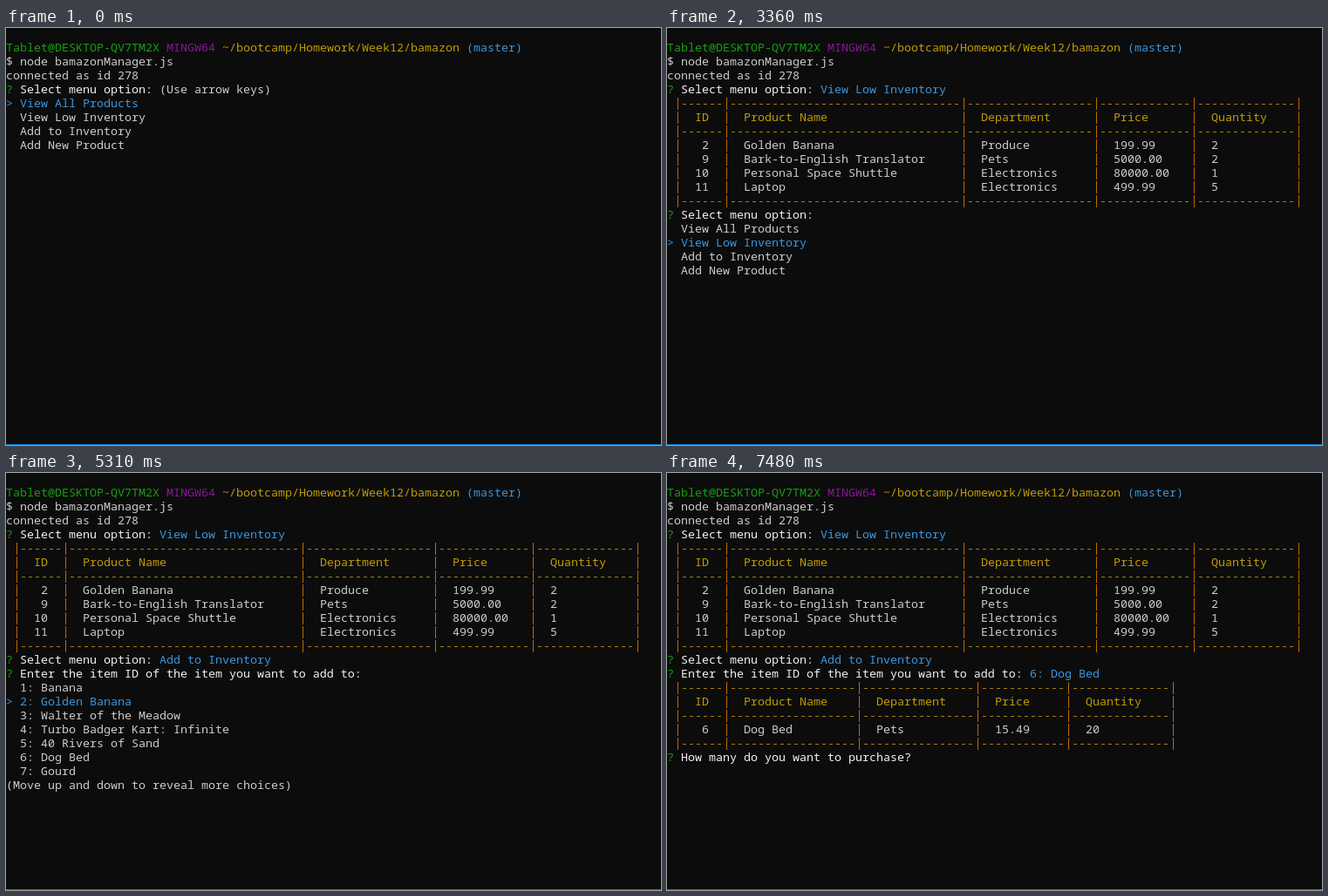
Animation of 751x479 px, one loop 8 s. Source, as an HTML page with a canvas:

```html
<!DOCTYPE html>
<html lang="en">
<head>
<meta charset="utf-8">
<title>Inventory terminal</title>
<style>
  html, body { margin: 0; width: 100%; height: 100%; overflow: hidden; background: #0c0c0c; }
  canvas { display: block; }
</style>
</head>
<body>
<canvas id="term" width="751" height="479"></canvas>
<script>
const ctx = document.getElementById('term').getContext('2d', { alpha: false });
const LOOP = 8000, CELL = 8, LINE = 16, BASE = 27;
const GREY = '#cccccc', WHITE = '#f2f2f2', GREEN = '#13a10e', PURPLE = '#881798',
      YELLOW = '#c19c00', CYAN = '#3a96dd', BAR = '#c16a00', DASH = '#a87e08';

const MENU = ['View All Products', 'View Low Inventory', 'Add to Inventory', 'Add New Product'];
const ITEMS = ['Banana', 'Golden Banana', 'Walter of the Meadow', 'Turbo Badger Kart: Infinite',
  '40 Rivers of Sand', 'Dog Bed', 'Gourd', 'Orchard: The Movie', 'Bark-to-English Translator']
  .map((name, i) => `${i + 1}: ${name}`);
const HEAD = ['ID', 'Product Name', 'Department', 'Price', 'Quantity'];
const LOW_STOCK = [
  [' 2', 'Golden Banana', 'Produce', '199.99', '2'],
  [' 9', 'Bark-to-English Translator', 'Pets', '5000.00', '2'],
  ['10', 'Personal Space Shuttle', 'Electronics', '80000.00', '1'],
  ['11', 'Laptop', 'Electronics', '499.99', '5']
];
const CHOSEN = [[' 6', 'Dog Bed', 'Pets', '15.49', '20']];
const SELECT = 'Select menu option:';
const ENTER = 'Enter the item ID of the item you want to add to:';

function put(row, col, text, color) {
  ctx.fillStyle = color;
  ctx.fillText(text, col * CELL, BASE + row * LINE);
}

function bars(row, cols) {
  ctx.fillStyle = BAR;
  for (const c of cols) ctx.fillRect(c * CELL + 4, BASE + row * LINE - 11, 1, 14);
}

function rule(row, cols) {
  bars(row, cols);
  ctx.fillStyle = DASH;
  for (let c = cols[0] + 1; c < cols[cols.length - 1]; c++)
    if (!cols.includes(c)) ctx.fillRect(c * CELL + 2, BASE + row * LINE - 4, 4, 1);
}

function cells(row, cols, values, color) {
  bars(row, cols);
  values.forEach((v, i) => put(row, cols[i] + 3, v, color));
}

function table(row, cols, data) {
  rule(row, cols);
  cells(row + 1, cols, HEAD, YELLOW);
  rule(row + 2, cols);
  data.forEach((d, i) => cells(row + 3 + i, cols, d, GREY));
  rule(row + 3 + data.length, cols);
}

function ask(row, question, tail = '', color = CYAN) {
  put(row, 0, '?', GREEN);
  put(row, 2, question, WHITE);
  put(row, question.length + 3, tail, color);
}

function list(row, options, active) {
  options.forEach((text, i) => {
    const on = i === active;
    if (on) put(row + i, 0, '>', CYAN);
    put(row + i, 2, text, on ? CYAN : GREY);
  });
}

function hint(row, question, fresh) {
  ask(row, question, fresh ? '(Use arrow keys)' : '', GREY);
}

function menu(row, active, fresh) {
  hint(row, SELECT, fresh);
  list(row + 1, MENU, active);
}

// The list scrolls once the pointer reaches its fourth line.
function picker(row, active) {
  const top = Math.max(0, active - 3);
  hint(row, ENTER, active === 0);
  list(row + 1, ITEMS.slice(top, top + 7), active - top);
  put(row + 8, 0, '(Move up and down to reveal more choices)', GREY);
}

function draw(t) {
  ctx.fillStyle = '#0c0c0c';
  ctx.fillRect(0, 0, 751, 479);
  ctx.fillStyle = '#0078d7';
  ctx.fillRect(0, 478, 751, 1);
  ctx.font = '13.3333px "Noto Sans Mono", "DejaVu Sans Mono", monospace';
  ctx.textBaseline = 'alphabetic';

  put(0, 0, 'Tablet@DESKTOP-QV7TM2X', GREEN);
  put(0, 23, 'MINGW64', PURPLE);
  put(0, 31, '~/bootcamp/Homework/Week12/bamazon', YELLOW);
  put(0, 66, '(master)', CYAN);
  put(1, 0, '$ node bamazonManager.js', GREY);
  put(2, 0, 'connected as id 278', GREY);

  if (t < 1240) return menu(3, t < 500 ? 0 : 1, t < 500);
  ask(3, SELECT, MENU[1]);
  if (t < 1320) return;
  table(4, [1, 8, 42, 61, 75, 90], LOW_STOCK);

  if (t < 4150) return menu(12, t < 3360 ? 0 : t < 3540 ? 1 : 2, t < 3360);
  ask(12, SELECT, MENU[2]);
  if (t < 4220) return;
  if (t < 4290) return hint(13, ENTER, true);

  if (t < 7400) return picker(13, [5310, 5550, 5730, 5920, 6200].filter(k => t >= k).length);
  ask(13, ENTER, ITEMS[5]);
  if (t < 7480) return;
  table(14, [1, 8, 27, 44, 57, 72], CHOSEN);
  ask(19, 'How many do you want to purchase?');
}

const start = performance.now();
function tick() {
  draw((performance.now() - start) % LOOP);
  requestAnimationFrame(tick);
}
tick();
</script>
</body>
</html>
```
